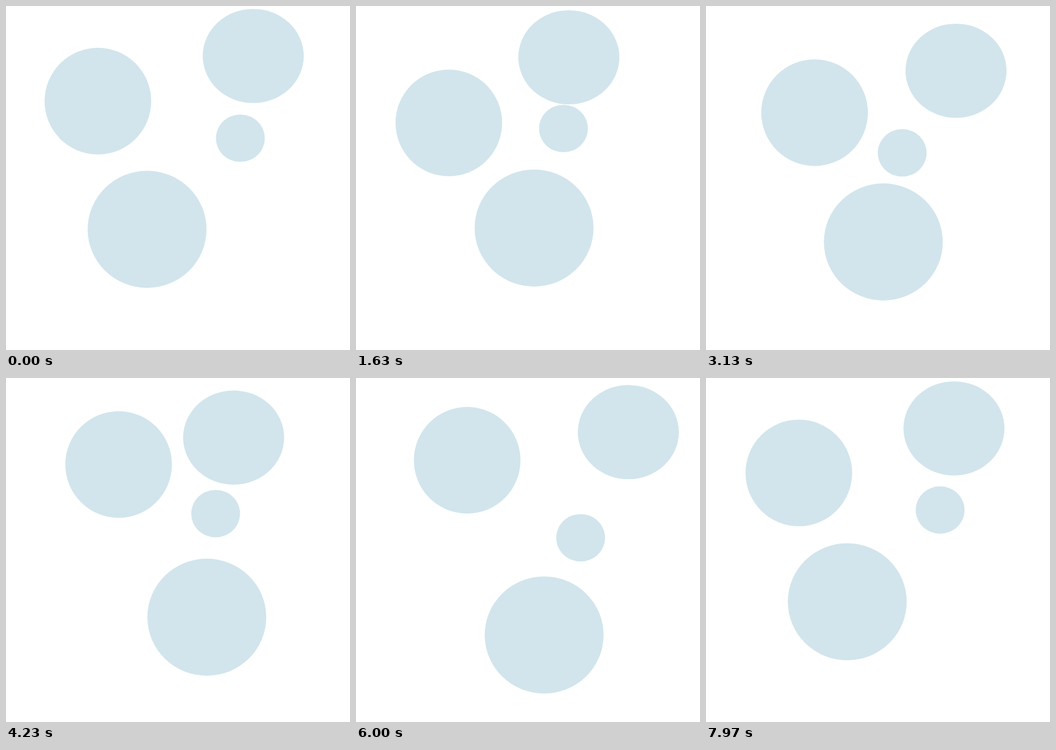
Recreate the animation shown at these times as an HTML page. Size 640 by 640 pixels, loop 8.01 s.

```html
<!DOCTYPE html>
<html lang="en">
<head>
<meta charset="utf-8">
<title>Drifting bubbles</title>
<style>
  html, body { margin: 0; width: 100%; height: 100%; overflow: hidden; background: #fff; }
  svg { display: block; width: 100%; height: 100%; }
  ellipse { fill: #d2e5ec; }
</style>
</head>
<body>
<svg id="stage" viewBox="0 0 640 640"></svg>
<script>
const LOOP = 8010;

// Each bubble drifts smoothly through a few points: [time, x, y].
const BUBBLES = [
  {
    rx: 99.2, ry: 99.2,
    points: [[0, 171, 177], [750, 158, 195], [1630, 172.7, 217.5], [3130, 202, 198.5],
             [4230, 209.5, 161], [5270, 244.7, 143.5], [6150, 204, 156],
             [6770, 225.3, 170.5], [7570, 195, 176]]
  },
  {
    rx: 94, ry: 87.6,
    points: [[0, 460, 93], [830, 426, 92], [1630, 396, 95.5], [2530, 413, 108.5],
             [2900, 476, 117], [3130, 465.2, 120.5], [4230, 423.5, 110.8],
             [5270, 459.3, 110.8], [5890, 505, 103], [6350, 502, 95],
             [6770, 491.4, 106.7], [7570, 474, 105]]
  },
  {
    rx: 45.4, ry: 44.1,
    points: [[0, 436, 246], [1630, 386, 228], [3130, 365, 273.2], [4230, 390, 252.3],
             [5270, 420.5, 279.5], [6770, 412.7, 298.3], [7800, 433, 244]]
  },
  {
    rx: 110.6, ry: 108.9,
    points: [[0, 262.5, 415.5], [1630, 331.3, 413], [2530, 334, 450], [3130, 329.9, 439],
             [4230, 373.6, 445], [5270, 374, 484], [6770, 315, 456]]
  }
];

// Closed cubic curve through one coordinate of the points.
function makePath(points, axis) {
  const n = points.length;
  const next = i => (i + 1) % n;
  const span = points.map((p, i) => (points[next(i)][0] - p[0] + LOOP) % LOOP);
  const rate = points.map((p, i) => (points[next(i)][axis] - p[axis]) / span[i]);
  const slope = points.map((_, i) => {
    const j = (i + n - 1) % n;
    return (rate[i] * span[j] + rate[j] * span[i]) / (span[i] + span[j]);
  });
  return t => {
    const i = points.findLastIndex(p => p[0] <= t);
    const j = next(i);
    const u = (t - points[i][0]) / span[i];
    const v = 1 - u;
    return points[i][axis] * v * v * (1 + 2 * u) + points[j][axis] * u * u * (1 + 2 * v) +
      span[i] * u * v * (slope[i] * v - slope[j] * u);
  };
}

const stage = document.getElementById("stage");
const parts = BUBBLES.map(({ rx, ry, points }) => {
  const el = document.createElementNS(stage.namespaceURI, "ellipse");
  el.setAttribute("rx", rx);
  el.setAttribute("ry", ry);
  stage.append(el);
  return { el, x: makePath(points, 1), y: makePath(points, 2) };
});

const begin = performance.now();
function tick() {
  const t = (performance.now() - begin) % LOOP;
  for (const { el, x, y } of parts) {
    el.setAttribute("cx", x(t).toFixed(2));
    el.setAttribute("cy", y(t).toFixed(2));
  }
  requestAnimationFrame(tick);
}
tick();
</script>
</body>
</html>
```
